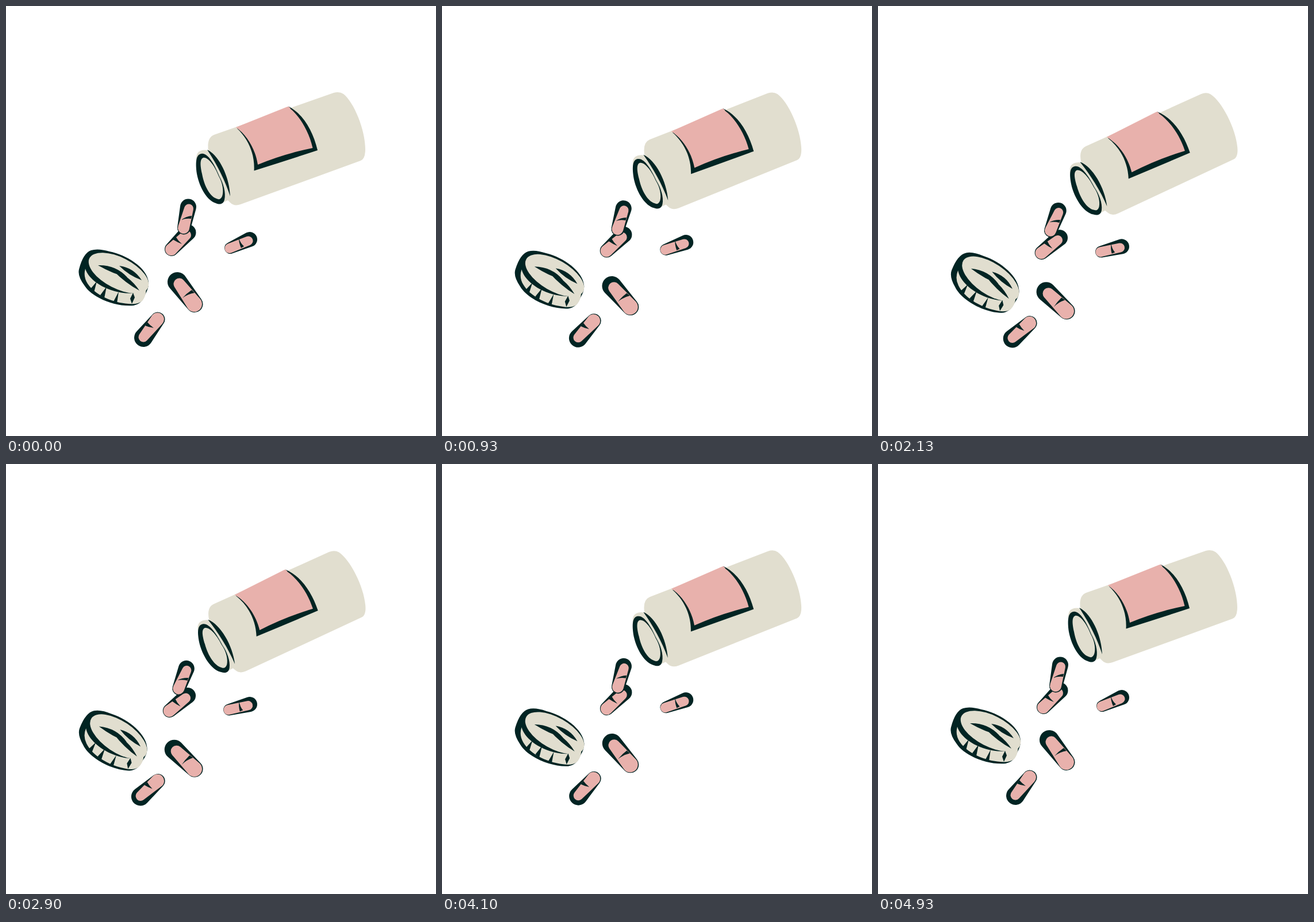
An HTML page for the animation above (5010 ms loop, 748 px wide and 748 px high).

```html
<!DOCTYPE html>
<html lang="en">
<head>
<meta charset="utf-8">
<title>Pill bottle</title>
<style>
  html, body { margin: 0; width: 100%; height: 100%; overflow: hidden; background: #fff; }
  svg { display: block; width: 100%; height: 100%; }
  .ink { fill: #012423; }
  .cream { fill: #e1decf; }
  .pink { fill: #e8b1ac; }
</style>
</head>
<body>
<svg id="stage" viewBox="0 0 748 748">
  <g id="bottle">
    <path class="cream" d="M362 224L570 151Q580 148 587 153C605 167 625 215 625 249Q625 266 617 269L408 345Q397 349 390 342L386 338L372 344C350 345 329 290 331 262Q333 248 352 251Q349 229 362 224Z"/>
    <path class="ink" d="M350 250C371 260 389 298 390 331C381 303 366 274 350 250Z"/>
    <path class="ink" d="M340 257C351 255 363 276 371 296C378 308 383 325 380 337C378 345 372 346 365 343C351 339 337 318 332 292C329 270 331 258 340 257Z"/>
    <path class="cream" d="M343 264C352 262 364 280 370 296C377 308 379 322 376 331C373 337 370 337 366 335C355 331 345 314 341 292C337 274 338 266 343 264Z"/>
    <path class="ink" d="M402 213C422 232 433 258 431.500 286.500Q490 268 542 251C534 217 517 188 492 175Z"/>
    <path class="pink" d="M400 211L490 175Q493 174.500 495 179C511 192 527 218 533.500 247Q484 257 438 276C434 250 420 225 400 211Z"/>
  </g>
  <g id="cap">
    <path class="ink" d="M148 425Q160 421 180 427C210 433 245 455 248 480Q249 490 242 502Q237 518 222 521C190 524 150 507 137 487Q124 470 127 458Q134 430 148 425Z"/>
    <ellipse class="cream" cx="196" cy="464.500" rx="57" ry="27" transform="rotate(27 196 464.500)"/>
    <path class="cream" d="M138 457C143 474 167 493 200 498.500Q227 503 243.500 492Q244 504 237 513Q229 520 213 518C185 516 155 503 142 483Q134 471 138 457Z"/>
    <path class="ink" d="M158 479L153 498L147 492ZM175 488L171 508L164 503ZM196 497L193 517L187 514ZM221 499L224 507L219 518L216 509Z"/>
    <path class="ink" d="M160 451Q191 450 211 472Q186 466 160 451ZM186 460Q214 468 232 495Q209 483 186 460ZM197 452Q222 455 236 477Q214 469 197 452Z"/>
  </g>
</svg>
<script>
const stage = document.getElementById("stage");
const LOOP = 5010, LAST = 99;

// Outline around two circles [x, y, r] joined by their tangents.
function capsule([x1, y1, r1], [x2, y2, r2]) {
  const dir = Math.atan2(y2 - y1, x2 - x1);
  const open = Math.acos((r1 - r2) / Math.hypot(x2 - x1, y2 - y1));
  const at = (x, y, r, a) => `${x + r * Math.cos(a)} ${y + r * Math.sin(a)}`;
  const big = r1 > r2 ? 1 : 0;
  return `M${at(x1, y1, r1, dir + open)}` +
    `A${r1} ${r1} 0 ${big} 1 ${at(x1, y1, r1, dir - open)}` +
    `L${at(x2, y2, r2, dir - open)}` +
    `A${r2} ${r2} 0 ${1 - big} 1 ${at(x2, y2, r2, dir + open)}Z`;
}

function addPath(parent, kind, d) {
  const path = document.createElementNS(stage.namespaceURI, "path");
  path.setAttribute("class", kind);
  path.setAttribute("d", d);
  parent.appendChild(path);
}

function makePill({ ink, pink, slit }) {
  const g = document.createElementNS(stage.namespaceURI, "g");
  addPath(g, "ink", capsule(...ink));
  addPath(g, "pink", capsule(...pink));
  addPath(g, "ink", slit);
  stage.appendChild(g);
  return g;
}

// swing: pivot x, pivot y, full turn in degrees
const pills = [
  { ink: [[316.5, 394, 14], [288, 423, 12]], pink: [[313.5, 398.5, 8.5], [287.5, 423.5, 10.5]],
    slit: "M290 406L295 401Q299 408 306 414Q298 411 290 406Z", swing: [227, 394, 6.2] },
  { ink: [[317, 349.5, 14], [309.5, 386, 11.5]], pink: [[318, 352.5, 8], [309, 386, 10]],
    slit: "M305 372Q313 366 323 365L322 370Q313 369 305 372Z", swing: [275, 332, 9.5] },
  { ink: [[424, 406, 13], [390, 421, 10]], pink: [[421.5, 408.5, 8], [389, 421.5, 8.5]],
    slit: "M405 404Q408 413 414 418L409 421Q405 412 405 404Z", swing: [350, 412, 10] },
  { ink: [[298, 480, 17], [328, 518.500, 14.5]], pink: [[301.5, 483.5, 10], [327.5, 518.5, 13.5]],
    slit: "M307 508Q314 500 323 494L328 499Q316 501 307 508Z", swing: [408, 524, -9.1] },
  { ink: [[239, 577, 16], [264, 545, 12.5]], pink: [[239, 576, 8.5], [263.5, 545, 11.5]],
    slit: "M242 556L246 550Q250 555 257 560Q249 559 242 556Z", swing: [228, 549, 10.9] }
];

const parts = [
  [document.getElementById("bottle"), [590, 245, -5.3]],
  [document.getElementById("cap"), [115, 468, 7.4]],
  ...pills.map(p => [makePill(p), p.swing])
];

// Leaves briskly, settles softly at the far end.
const ease = x => x * (0.45 + x * (2.1 - 1.55 * x));

function draw(ms) {
  const t = ms % LOOP;
  // Poses change at 0 and 30 ms of every 100 ms.
  const step = Math.min(LAST, 2 * Math.floor(t / 100) + (t % 100 >= 30 ? 1 : 0));
  const p = ease(1 - Math.abs(1 - 2 * step / LAST));
  for (const [node, [x, y, turn]] of parts)
    node.setAttribute("transform", `rotate(${turn * p} ${x} ${y})`);
}

const start = performance.now();
function tick() {
  draw(performance.now() - start);
  requestAnimationFrame(tick);
}
tick();
</script>
</body>
</html>
```
